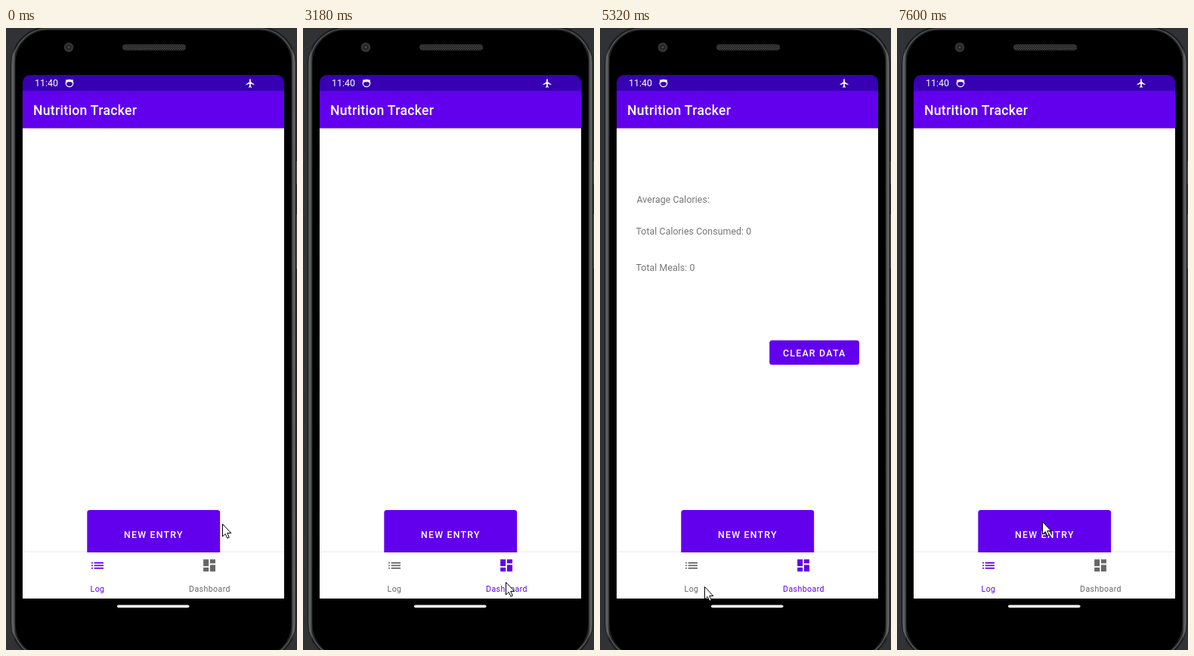
An HTML page that plays this animation: 385x822 px, repeating every 8 s.

```html
<!DOCTYPE html>
<html lang="en">
<head>
<meta charset="utf-8">
<title>Nutrition Tracker</title>
<style>
  html, body { margin: 0; width: 100%; height: 100%; overflow: hidden; background: #303235; }
  svg { display: block; width: 385px; height: 822px; font-family: Roboto, sans-serif; }
  .title { font-size: 17.6px; font-weight: 500; letter-spacing: .29px; }
  .clock { font-size: 12.4px; }
  .caps { font-size: 12.35px; font-weight: 500; letter-spacing: 1.22px; fill: #fff; }
  .body { font-size: 12.35px; letter-spacing: .07px; fill: #757575; }
  .tab { font-size: 10.6px; letter-spacing: .4px; text-anchor: middle; }
</style>
</head>
<body>
<svg viewBox="0 0 385 822">
  <defs>
    <linearGradient id="metal">
      <stop offset="0" stop-color="#3c3e40"/><stop offset=".007" stop-color="#6b6c6e"/>
      <stop offset=".016" stop-color="#202122"/><stop offset=".984" stop-color="#202122"/>
      <stop offset=".993" stop-color="#6b6c6e"/><stop offset="1" stop-color="#3c3e40"/>
    </linearGradient>
    <pattern id="mesh" width="3" height="3" patternUnits="userSpaceOnUse">
      <path d="M0 0L3 3M3 0L0 3" stroke="#484848" stroke-width=".7"/>
    </pattern>
    <clipPath id="screen"><path d="M22 754V72a10 10 0 0 1 10-10H358a10 10 0 0 1 10 10V754Z"/></clipPath>
    <clipPath id="bar"><path d="M22 693H368V754H22Z"/></clipPath>
  </defs>

  <!-- phone -->
  <path d="M383 176h2v30h-2zM383 246h2v72h-2z" fill="#555"/>
  <rect x="6.500" y="-1.500" width="377" height="837" rx="49" fill="url(#metal)" stroke="#18191a"/>
  <rect x="9.500" y="1" width="371" height="832" rx="46" fill="none" stroke="#5c5d5f" stroke-width="1.200"/>
  <rect x="12.500" y="3" width="365" height="828" rx="43" fill="#000"/>
  <circle cx="83" cy="25.500" r="6.300" fill="#343434"/>
  <circle cx="83" cy="25.500" r="3.600" fill="#242424"/>
  <circle cx="83" cy="25.500" r="1.200" fill="#565656"/>
  <rect x="154" y="21.500" width="84" height="8" rx="4" fill="#222"/>
  <rect x="154" y="21.500" width="84" height="8" rx="4" fill="url(#mesh)"/>
  <rect x="147" y="762.500" width="95.500" height="3.600" rx="1.800" fill="#fff"/>

  <g clip-path="url(#screen)">
    <path d="M22 132H368V754H22Z" fill="#fff"/>
    <path d="M22 62H368V83H22Z" fill="#3700b3"/>
    <path d="M22 83H368V132.600H22Z" fill="#6200ee"/>
    <g fill="#fff">
      <text class="clock" x="38" y="77.300">11:40</text>
      <text class="title" x="36" y="115">Nutrition Tracker</text>
      <circle cx="84" cy="73" r="4.700" fill="none" stroke="#fff" stroke-width="1.300"/>
      <path d="M79.500 68l2.500 1h4l2.500-1 .7 4.500q-2.200.2-3-1.300h-4.400q-.8 1.500-3 1.300Z"/>
      <path transform="translate(323 73) scale(.57) translate(-11.500 -12)" d="M21 16v-2l-8-5V3.500C13 2.700 12.300 2 11.500 2S10 2.700 10 3.500V9l-8 5v2l8-2.500V19l-2 1.500V22l3.500-1 3.500 1v-1.500L13 19v-5.500Z"/>
    </g>

    <g id="dashboard">
      <text class="body" x="48.500" y="231">Average Calories:</text>
      <text class="body" x="47.500" y="273">Total Calories Consumed: 0</text>
      <text class="body" x="47.500" y="321">Total Meals: 0</text>
      <rect x="224.200" y="412.700" width="118.800" height="32.300" rx="3.500" fill="#6200ee"/>
      <text class="caps" x="242" y="433.500">CLEAR DATA</text>
    </g>

    <rect x="107.300" y="637" width="175.900" height="70" rx="3.500" fill="#6200ee"/>
    <text class="caps" x="156" y="674">NEW ENTRY</text>

    <path d="M22 691.500H368V693H22Z" fill="#000" opacity=".06"/>
    <path d="M22 693H368V754H22Z" fill="#fff"/>
    <circle id="ripple" cy="723" fill="#e7e7e7" clip-path="url(#bar)"/>
    <g id="logTab">
      <path transform="translate(110.500 699.900) scale(.88)" d="M3 13h2v-2H3zM3 17h2v-2H3zM3 9h2V7H3zM7 13h14v-2H7zM7 17h14v-2H7zM7 7v2h14V7z"/>
      <text class="tab" x="121" y="745">Log</text>
    </g>
    <g id="dashTab">
      <path transform="translate(258.500 699.700) scale(.88)" d="M3 13h8V3H3zM3 21h8v-6H3zM13 21h8V11h-8zM13 3v6h8V3z"/>
      <text class="tab" x="269.500" y="745">Dashboard</text>
    </g>
  </g>

  <g id="pointer">
    <g id="press" fill="none">
      <circle r="14" stroke="#000"/><circle r="13" stroke="#fff"/>
    </g>
    <path d="M.5.5V17L4.300 13.500 6.900 19.300 9.300 18.200 6.800 12.500H11.800Z" fill="#fff" stroke="#000"/>
  </g>
</svg>
<script>
const LOOP = 8000;
const el = id => document.getElementById(id);
const dashboard = el("dashboard"), ripple = el("ripple"), pointer = el("pointer");
const press = el("press"), logTab = el("logTab"), dashTab = el("dashTab");

// pointer tip: time, x, y
const path = [
  [0, 286, 655], [280, 287, 690], [400, 286, 692], [870, 260, 614],
  [1090, 218, 638], [1430, 198, 656], [2400, 198, 656], [2610, 268, 732],
  [3950, 268, 732], [4200, 284, 570], [4500, 140, 246], [4760, 140, 246],
  [4960, 234, 430], [5180, 170, 690], [5320, 138, 738], [5600, 123, 736],
  [5800, 123, 720], [6450, 123, 720], [6540, 112, 727], [6760, 165, 545],
  [6830, 178, 512], [7000, 282, 580], [7270, 192, 652], [LOOP, 192, 652]
];
const clicks = [[2880, 3010], [5880, 6010], [7530, 7600]];
const ripples = [
  { x: 269, start: 3220, grown: 3600, fade: 3760, end: 3950, radius: 80 },
  { x: 121, start: 6180, grown: 6400, fade: 6300, end: 6450, radius: 72 }
];

const ramp = (t, a, b) => Math.min(1, Math.max(0, (t - a) / (b - a)));
const within = (t, a, b) => t >= a && t < b;

function pointerAt(t) {
  const i = path.findIndex(key => key[0] > t);
  const [t0, x0, y0] = path[i - 1], [t1, x1, y1] = path[i];
  const k = ramp(t, t0, t1);
  return [x0 + (x1 - x0) * k, y0 + (y1 - y0) * k];
}

function draw(t) {
  pointer.setAttribute("transform", `translate(${pointerAt(t).map(Math.round)})`);
  press.setAttribute("opacity", clicks.some(c => within(t, ...c)) ? 1 : 0);

  const onDashboard = within(t, 3180, 6090);
  logTab.setAttribute("fill", onDashboard ? "#666" : "#6200ee");
  dashTab.setAttribute("fill", onDashboard ? "#6200ee" : "#666");
  dashboard.setAttribute("opacity", ramp(t, 3240, 3520) * (1 - ramp(t, 6200, 6400)));

  const r = ripples.find(r => within(t, r.start, r.end));
  ripple.setAttribute("opacity", r ? ramp(t, r.start, r.start + 80) * (1 - ramp(t, r.fade, r.end)) : 0);
  if (r) {
    const growth = 1 - (1 - ramp(t, r.start, r.grown)) ** 2;
    ripple.setAttribute("cx", r.x);
    ripple.setAttribute("r", r.radius * (.3 + .7 * growth));
  }
}

function tick() {
  draw(performance.now() % LOOP);
  requestAnimationFrame(tick);
}
tick();
</script>
</body>
</html>
```
